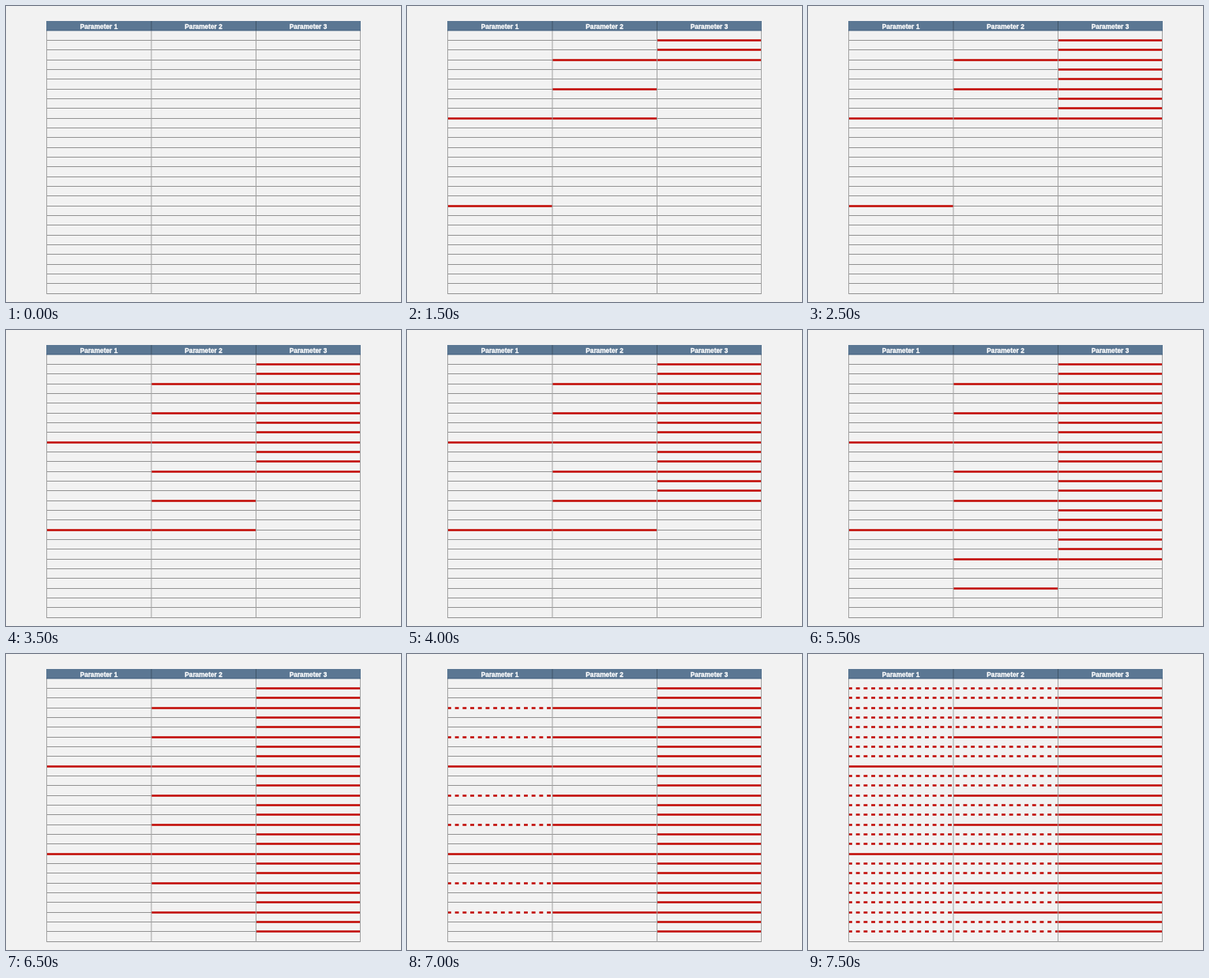
These frames come from a looping animation (500 px wide and 375 px high, 8000 ms). An HTML page:

```html
<!DOCTYPE html>
<html lang="en">
<head>
<meta charset="utf-8">
<title>Nested parameters</title>
<style>
  html, body { margin: 0; width: 100%; height: 100%; overflow: hidden; background: #f2f2f2; }
  svg { display: block; width: 500px; height: 375px; }
  text { font: bold 8.3px "Liberation Sans", Arial, sans-serif; fill: #fff; stroke: #fff; stroke-width: 0.3; text-anchor: middle; }
  .rule { stroke: #929292; stroke-width: 1; }
  .side { stroke: #a2a2a2; stroke-width: 1; }
  .mark { stroke: #c00600; stroke-width: 2.4; }
  .dash { stroke-dasharray: 4.9 4.8; }
</style>
</head>
<body>
<svg id="stage" viewBox="0 0 500 375"></svg>
<script>
const STEP = 500, STEPS = 16, ROWS = 27;
const edges = [51, 184, 316.5, 449];
const stage = document.getElementById("stage");
const timed = [];

function add(tag, attrs, label) {
  const el = document.createElementNS("http://www.w3.org/2000/svg", tag);
  for (const key in attrs) el.setAttribute(key, attrs[key]);
  if (label) el.textContent = label;
  stage.append(el);
  return el;
}

const rowY = k => 31 + Math.floor(k * 37 / 3) + 0.5;

function line(col, k, cls) {
  return add("line", { x1: edges[col], x2: edges[col + 1], y1: rowY(k), y2: rowY(k), class: cls });
}

function show(el, from, to) {
  timed.push({ el, from, to });
}

// Nested loops: column 2 fills once per block of nine, column 3 once per three rows.
function solidStep(col, k) {
  const block = Math.floor((k - 1) / 9);
  if (col === 0) return 1;
  if (col === 1) return 2 + 4 * block;
  return 3 + 4 * block + Math.floor(((k - 1) % 9) / 3);
}

// Dashes extend column 2's lines to the left first, then column 3's.
const dashStep = k => k % 3 === 0 ? 14 : 15;

const spacing = [9, 3, 1];

for (let col = 0; col < 3; col++) {
  for (let k = 1; k <= ROWS; k++) {
    const rule = line(col, k, "rule");
    if (k === ROWS) continue;
    const solid = k % spacing[col] === 0;
    const from = solid ? solidStep(col, k) : dashStep(k);
    const mark = line(col, k, solid ? "mark" : "mark dash");
    // The dash pattern runs on across the column edge.
    if (!solid) mark.setAttribute("stroke-dashoffset", edges[col] - edges[0]);
    show(rule, 0, from);
    show(mark, from, STEPS);
  }
}

for (const x of [51.5, 184, 316.5, 448.5])
  add("line", { x1: x, x2: x, y1: 31, y2: 365, class: "side" });

add("rect", { x: 51, y: 19, width: 398, height: 12, fill: "#5b7793" });
add("rect", { x: 51, y: 30.5, width: 398, height: 1, fill: "#3f5d7d" });
for (const x of [184, 316.5])
  add("line", { x1: x, x2: x, y1: 19, y2: 31, stroke: "#3f5568" });
[117.5, 250, 382.5].forEach((x, i) => add("text", { x, y: 29.4 }, "Parameter " + (i + 1)));

let shown = -1;
const start = performance.now();

function tick() {
  const step = Math.floor((performance.now() - start) / STEP) % STEPS;
  if (step !== shown) {
    shown = step;
    for (const { el, from, to } of timed)
      el.style.visibility = step >= from && step < to ? "visible" : "hidden";
  }
  requestAnimationFrame(tick);
}
tick();
</script>
</body>
</html>
```
